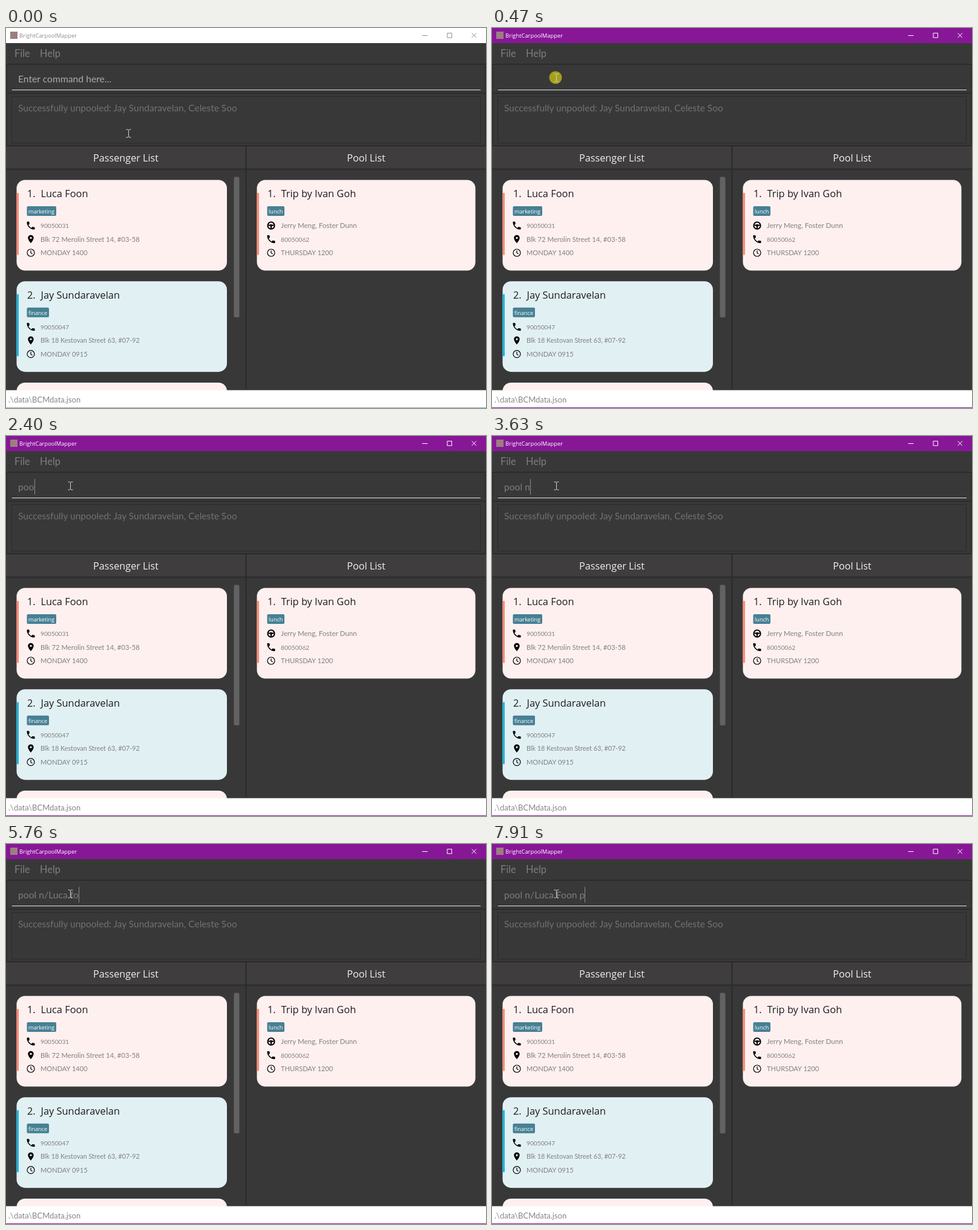
Write an HTML page that moves like this. It is 793 px wide and 629 px high and loops after 8000 ms.

```html
<!DOCTYPE html>
<html lang="en">
<head>
<meta charset="utf-8">
<title>Carpool planner</title>
<style>
  html, body { margin: 0; width: 100%; height: 100%; overflow: hidden; background: #383838; }
  svg { display: block; width: 793px; height: 629px; }
  text { white-space: pre; font: 15.7px Lato, sans-serif; fill: #7e7e7e; }
  .ui { font-family: "Open Sans", "Noto Sans", sans-serif; }
  .head { font-size: 16.2px; fill: #f0f0f0; text-anchor: middle; }
  .name { font-size: 16.4px; fill: #1c1c1c; }
  .tag { font-size: 9.1px; fill: #fff; }
  .row { fill: #808080; }
  .line { fill: none; stroke: #2b2b2b; }
</style>
</head>
<body>
<svg viewBox="0 0 793 629">
  <defs>
    <path id="phone" transform="scale(.73) translate(-12 -12)" d="M6.6 10.8c1.4 2.8 3.8 5.1 6.6 6.6l2.2-2.2c.3-.3.7-.4 1-.2 1.1.4 2.3.6 3.6.6.6 0 1 .4 1 1V20c0 .6-.4 1-1 1-9.4 0-17-7.6-17-17 0-.6.4-1 1-1h3.5c.6 0 1 .4 1 1 0 1.3.2 2.5.6 3.6.1.4 0 .8-.3 1z"/>
    <path id="pin" transform="scale(.67) translate(-12 -12)" d="M12 2C8.1 2 5 5.1 5 9c0 5.2 7 13 7 13s7-7.8 7-13c0-3.9-3.1-7-7-7zm0 9.5a2.5 2.5 0 1 1 0-5 2.5 2.5 0 0 1 0 5z"/>
    <g id="clock" fill="none" stroke="#000" stroke-width="1.2">
      <circle r="6"/><path d="M0-3.8V.3L2.6 2"/>
    </g>
    <g id="wheel" fill="none" stroke="#000" stroke-width="1.9">
      <circle r="5.7"/><path d="M-5.5-.5H5.5M0 0V5.5"/><circle r="1.2"/>
    </g>
    <clipPath id="list"><path d="M0 234H793V600H0z"/></clipPath>
  </defs>

  <rect width="793" height="629" fill="#383838"/>
  <rect id="bar" width="793" height="25"/>
  <rect x="7" y="6" width="12" height="12" fill="#9a7f80"/>
  <text id="title" class="ui" x="22" y="16" style="font-size:9.4px">BrightCarpoolMapper</text>
  <path id="buttons" fill="none" d="M687.5 12.5h9M729 8.5h7.5v7.5H729zM769.5 8.5l7.5 7.5m0-7.5l-7.5 7.5"/>

  <text x="14" y="48" style="font-size:16.4px">File</text>
  <text x="56" y="48" style="font-size:16.4px">Help</text>
  <rect y="196" width="793" height="37" fill="#403d3e"/>
  <path class="line" stroke-width="2" d="M0 60H793M0 108H793M0 195H793M0 233.5H793M396.5 195V599M.5 60V195M792.5 60V195"/>
  <path class="line" d="M9.5 113.5H783.5V190.5H9.5z"/>
  <path d="M10 102.5H784" stroke="#e4e4e4"/>
  <text x="20" y="138" style="font-size:15.5px;fill:#727272">Successfully unpooled: Jay Sundaravelan, Celeste Soo</text>
  <text class="ui head" x="198" y="221">Passenger List</text>
  <text class="ui head" x="595" y="221">Pool List</text>

  <g id="cards" clip-path="url(#list)"></g>
  <rect x="376.5" y="246.5" width="9" height="232.5" rx="2" fill="#626262"/>

  <rect y="599.5" width="793" height="29.5" fill="#fff"/>
  <text x="4" y="620" style="font-size:13px;fill:#868686">.\data\BCMdata.json</text>
  <rect id="edge" y="628" width="793" height="1"/>

  <circle id="click" cx="105" cy="82" r="10.5" fill="#a5a019"/>
  <text id="input" x="20" y="90"></text>
  <rect id="caret" y="71" width="1" height="26" fill="#8c8c8c"/>
  <path id="mouse" fill="none" stroke="#d0d0d0" d="M-4-6.5H-1.5L0-5.5L1.5-6.5H4M-4 6.5H-1.5L0 5.5L1.5 6.5H4M0-5.5V5.5"/>
</svg>
<script>
const $ = id => document.getElementById(id);

// rows: [icon, text, font size]
function card(x, y, w, fill, accent, num, name, tag, tagWidth, rows) {
  const lines = rows.map(([icon, text, size], i) => {
    const cy = y + 75 + i * 22.5;
    return `<use href="#${icon}" x="${x + 23}" y="${cy}"/>
      <text class="row" x="${x + 39}" y="${cy + 4}" style="font-size:${size}px">${text}</text>`;
  }).join("");
  return `<rect x="${x - .5}" y="${y - .5}" width="${w}" height="150" rx="14" fill="${fill}"/>
    <rect x="${x - .5}" y="${y + 21}" width="3.5" height="102.5" fill="${accent}"/>
    <text class="ui name" x="${x + 17}" y="${y + 28}">${num}.</text>
    <text class="ui name" x="${x + 39.5}" y="${y + 28}">${name}</text>
    <rect x="${x + 16.5}" y="${y + 43}" width="${tagWidth}" height="16" rx="2" fill="#478094"/>
    <text class="ui tag" x="${x + 19}" y="${y + 55}">${tag}</text>${lines}`;
}

const pink = "#fff0f0", salmon = "#fa8a72";
$("cards").innerHTML =
  card(18, 252, 347.5, pink, salmon, 1, "Luca Foon", "marketing", 48.5, [
    ["phone", "90050031", 10.2],
    ["pin", "Blk 72 Merolin Street 14, #03-58", 11.3],
    ["clock", "MONDAY 1400", 11.1]]) +
  card(18, 419.7, 347.5, "#e1f0f3", "#1fb4da", 2, "Jay Sundaravelan", "finance", 36.5, [
    ["phone", "90050047", 10.2],
    ["pin", "Blk 18 Kestovan Street 63, #07-92", 10.8],
    ["clock", "MONDAY 0915", 11.1]]) +
  card(415, 252, 361, pink, salmon, 1, "Trip by Ivan Goh", "lunch", 28.5, [
    ["wheel", "Jerry Meng, Foster Dunn", 11.6],
    ["phone", "80050062", 10.2],
    ["clock", "THURSDAY 1200", 11.1]]) +
  `<rect x="17.5" y="587" width="347.5" height="60" rx="14" fill="${pink}"/>`;

// [time, typed text]; a typo is erased and retyped with a capital
const typing = [
  [0, ""], [2220, "p"], [2310, "po"], [2400, "poo"], [2620, "pool"], [2880, "pool "],
  [3630, "pool n"], [3930, "pool n/"], [4300, "pool n/L"], [4430, "pool n/Lu"],
  [4560, "pool n/Luc"], [4750, "pool n/Luca"], [5060, "pool n/Luca "],
  [5250, "pool n/Luca fo"], [5450, "pool n/Luca foo"], [5760, "pool n/Luca fo"],
  [5920, "pool n/Luca "], [6080, "pool n/Luca"], [6230, "pool n/Luca "],
  [6390, "pool n/Luca F"], [6540, "pool n/Luca Fo"], [6730, "pool n/Luca Foo"],
  [7020, "pool n/Luca Foon"], [7430, "pool n/Luca Foon "], [7910, "pool n/Luca Foon p"]
];
const caretOff = [[0, 570], [1080, 1530], [2040, 2220], [3390, 3630]];
const within = (t, [from, to]) => t >= from && t < to;
const show = (id, on) => $(id).setAttribute("visibility", on ? "visible" : "hidden");

function draw(t) {
  const active = t >= 470;
  const ink = active ? "#fff" : "#8e8e8e";
  $("bar").setAttribute("fill", active ? "#881798" : "#fff");
  $("edge").setAttribute("fill", active ? "#881798" : "#9aa6aa");
  $("title").style.fill = ink;
  $("buttons").setAttribute("stroke", ink);

  // the pointer travels in eight steps
  const p = t < 30 ? 0 : Math.min(1, (Math.floor((t - 30) * 7 / 360) + 1) / 8);
  const k = p * p * (3 - 2 * p);
  $("mouse").setAttribute("transform", `translate(${202.5 - 96 * k} ${174.5 - 92 * k})`);
  show("click", within(t, [470, 570]));

  const typed = typing.findLast(([at]) => t >= at)[1];
  const input = $("input");
  input.textContent = active ? typed : "Enter command here...";
  input.style.fill = active ? "#7e7e7e" : "#ababab";
  $("caret").setAttribute("x", 20 + (typed ? Math.round(input.getComputedTextLength()) : 0));
  show("caret", !caretOff.some(span => within(t, span)));
}

const start = performance.now();
function tick() {
  draw((performance.now() - start) % 8000);
  requestAnimationFrame(tick);
}
tick();
</script>
</body>
</html>
```
